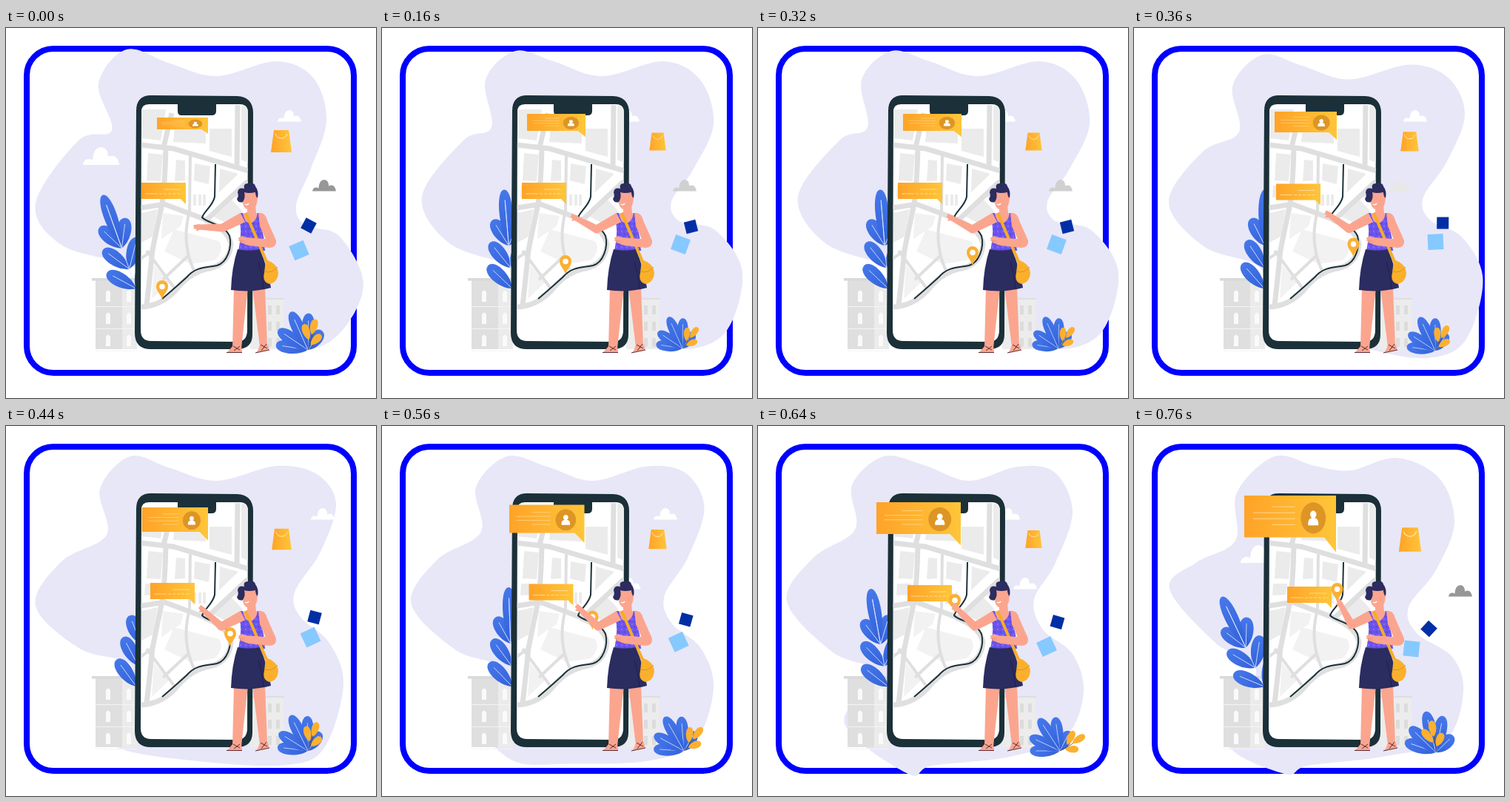
Write an HTML page that moves like this. It is 500x500 px and loops after 800 ms.

```html
<!DOCTYPE html>
<html lang="en">
<head>
<meta charset="utf-8">
<title>Map walk</title>
<style>
html, body { margin: 0; width: 100%; height: 100%; overflow: hidden; background: #fff; }
svg { display: block; width: 100vw; height: 100vh; }
.road { fill: none; stroke: #dfdfdf; stroke-width: 7; }
.skin { fill: #fba58f; }
.navy { fill: #2b2c60; }
.vein { fill: none; stroke: #dfe8ff; stroke-width: .8; }
.line { fill: none; stroke: #ffe2a6; stroke-width: .8; }
</style>
</head>
<body>
<svg viewBox="0 0 500 500" xmlns="http://www.w3.org/2000/svg">
  <defs>
    <linearGradient id="gold"><stop stop-color="#ffa328"/><stop offset="1" stop-color="#ffc539"/></linearGradient>
    <linearGradient id="blue" x1="0" y1="0" x2="0" y2="1"><stop stop-color="#4678ea"/><stop offset="1" stop-color="#3261d9"/></linearGradient>
    <pattern id="dots" width="7" height="7" patternUnits="userSpaceOnUse">
      <rect width="7" height="7" fill="#6b53ee"/><circle cx="2" cy="2" r=".8" fill="#a99bff"/><circle cx="5.5" cy="5.5" r=".8" fill="#4c38c4"/>
    </pattern>
    <path id="cloud" d="M0 24Q1 16 8 16Q12 16 13 18Q14 0 25 0Q34 1 34 13Q43 9 47 17Q49 20 49 24Z"/>
    <path id="screen" d="M193 103H316Q327 103 327 115L326 410Q325 424 312 424L196 423Q182 423 182 408L183 113Q183 103 193 103Z"/>
    <clipPath id="clip"><use href="#screen"/></clipPath>
  </defs>

  <rect width="500" height="500" fill="#fff"/>
  <rect x="28" y="28" width="442" height="438" rx="36" fill="none" stroke="#00f" stroke-width="8"/>
  <path id="blob" fill="#e8e7f8"/>
  <use id="cloudL" href="#cloud" fill="#fff"/>
  <use id="cloudR" href="#cloud" fill="#fff"/>
  <use id="cloudG" href="#cloud"/>
  <g id="houses"></g>
  <g id="leaf"></g>

  <path fill="#1b3038" d="M196 91L312 92Q334 93 334 115L333 414Q333 434 312 434L196 434Q174 434 174 412L176 112Q176 91 196 91Z"/>
  <use href="#screen" fill="#fff"/>
  <g clip-path="url(#clip)">
    <g fill="#ebebeb">
      <path d="M183 110H216L209 152L183 149ZM229 122H270V156L226 154ZM275 136H305V174L275 166ZM318 105H327V182L318 178Z"/>
      <path d="M192 169L212 171L209 207L190 206ZM188 213H207L205 228L187 229ZM230 178L242 179V206L228 207ZM255 183L276 187L274 211L254 206Z"/>
      <path d="M253 225H257V240H253ZM260 225H264V240H260ZM266 225H270V240H266ZM289 190L314 197L288 222ZM279 254L305 232L320 248L302 266ZM309 228L327 212V244Z"/>
      <path d="M183 250L205 245L198 282L183 290Z"/>
    </g>
    <path fill="#f2f2f2" d="M227 272L288 288Q296 300 282 314L250 319L214 302ZM212 250L240 254L236 268L210 285ZM200 320L220 344L197 366Z"/>
    <path class="road" d="M182 158L226 163L327 193M224 115L213 161M313 104L312 190M182 243L214 238L246 250L270 259M327 207L268 262"/>
    <path class="road" stroke-width="6" d="M216 160Q215 210 211 237Q204 270 198 300Q194 340 190 375M182 377Q208 376 228 356Q246 332 270 326Q302 321 304 292Q300 272 268 259"/>
    <path class="road" style="stroke-width:4" d="M249 170L248 248Q238 285 250 318L254 328M190 301L228 352M246 308L212 340M182 312L198 300"/>
    <path fill="none" stroke="#1b3038" stroke-width="2" d="M283 184L282 228C280 240 267 248 265 256C272 264 295 265 302 281C306 296 299 317 285 321C270 324 257 322 244 337Q232 348 211 366"/>
  </g>
  <path fill="#1b3038" d="M232 100H284V112Q284 118 278 118H237Q232 118 232 112Z"/>

  <g id="call">
    <path fill="url(#gold)" d="M0 0H125V76L109 56H0Z"/>
    <path class="line" d="M38 15H69M12 23H69M12 31H69M38 39H69"/>
    <ellipse cx="94" cy="30" rx="17" ry="21" fill="#dd9525"/>
    <path fill="#fff" d="M87 40Q86 31 92 30Q89 27 90 23Q94 17 98 23Q99 27 96 30Q102 31 101 40Z"/>
  </g>
  <g id="msg">
    <path fill="url(#gold)" d="M0 0H60V29L53 22H0Z"/>
    <path class="line" d="M30 9H53M5 15H22"/><path class="line" stroke-dasharray="4 2" d="M24 15H55"/>
  </g>

  <g id="bag">
    <path fill="url(#gold)" d="M-10-15H10L14 15H-14Z"/>
    <path fill="none" stroke="#fff0c8" stroke-width="1" d="M-8-10Q-6-4 0-4Q6-4 8-10"/>
  </g>
  <rect id="dark" x="-8" y="-8" width="16" height="16" fill="#002fa5"/>
  <rect id="pale" x="-10.5" y="-10.5" width="21" height="21" fill="#86c9ff"/>
  <g id="plant"><g id="fan"></g><g id="sprig"></g></g>

  <g id="pin">
    <path fill="#fbb034" d="M0 0C-2-8-8-11-8-18A8 8 0 0 1 8-18C8-11 2-8 0 0Z"/>
    <circle cy="-17.5" r="3.8" fill="#fff"/>
  </g>

  <g id="woman">
    <path class="skin" d="M308 350H327L318 433H306ZM333 350H350L353 429L343 431Z"/>
    <path class="skin" d="M306 430H318L319 438H299Q303 434 306 430ZM343 428L353 426L356 435L338 439Q342 434 343 428Z"/>
    <path fill="none" stroke="#5b2b35" d="M298 438.5H319M307 430L316 435M316 430L308 436M337 439L356 435M344 428L353 433M352 427L345 436"/>
    <path class="skin" d="M326 238H337L338 250L347 251L342 270H318L316 252L326 249Z"/>
    <path fill="url(#dots)" d="M317 250H320Q322 262 329 264Q338 263 340 250H344Q345 270 348 282L350 301H314Q319 276 316 264Z"/>
    <path class="navy" d="M313 299Q328 302 343 299Q354 325 358 351Q332 358 304 354Q305 323 313 299Z"/>
    <path fill="none" stroke="#1f2050" d="M341 316Q347 335 348 353"/>
    <path fill="none" stroke="#f7ad25" stroke-width="4" d="M324 250L353 318"/>
    <path fill="#fbb02c" d="M351 313Q367 318 368 331Q367 344 356 346Q346 343 349 331Z"/>
    <path fill="none" stroke="#e0921c" d="M350 329Q359 332 367 323"/>
    <path class="skin" d="M341 250Q350 248 353 260L365 287Q366 296 357 297L328 294Q315 291 314 284Q318 279 324 283L351 285L343 268Z"/>
    <path fill="none" stroke="#e88b78" stroke-width=".8" d="M314 287L322 288M316 290L323 291"/>
    <path class="skin" d="M320 222H339Q341 232 338 240Q333 247 326 245Q320 243 320 234Z"/>
    <path class="navy" d="M322 217Q320 210 327 210Q336 208 337 214Q342 220 340 230Q337 227 337 222Q328 224 322 222Q324 229 320 235Q314 237 312 231Q315 228 313 222Q314 215 322 217Z"/>
    <path fill="none" stroke="#fff" stroke-width="1.4" d="M323 238Q326 240 328 237"/>
    <path id="arm" class="skin"/>
    <g id="hand" class="skin"><ellipse cx="1" rx="6" ry="4.5"/><path d="M0-4L9-3Q10-1 8 0L10 1Q10 4 6 4H0ZM-2-3L3-7Q6-7 4-4Z"/></g>
  </g>
</svg>
<script>
const $ = id => document.getElementById(id);
const set = (id, attr, value) => $(id).setAttribute(attr, value);
const move = (id, x, y, rest = "") => set(id, "transform", `translate(${x} ${y}) ${rest}`);
const nums = text => text.split(/[ ,]+/).map(Number);
const mix = (a, b) => Object.fromEntries(Object.keys(a).map(k => [k, a[k].map((v, i) => (v + b[k][i]) / 2)]));

// A rounded petal growing from (x, y), leaning by deg
function petal(x, y, deg, len, w, fill, vein = true) {
  const line = vein ? `<path class="vein" d="M0 0V${-len * .8}"/>` : "";
  return `<g transform="translate(${x} ${y}) rotate(${deg})"><path fill="${fill}" d="M0 0C${-w} ${-len * .3} ${-w} ${-len} 0 ${-len}C${w} ${-len} ${w} ${-len * .3} 0 0Z"/>${line}</g>`;
}

const blue = "url(#blue)";
let side = "";
for (const s of [-1, 1])
  for (const [y, deg, len] of [[0, 42, 45], [-28, 34, 44], [-58, 27, 41]]) side += petal(0, y, s * deg, len, 13, blue);
$("leaf").innerHTML = side + petal(0, -60, 0, 74, 12, blue) + '<path class="vein" d="M0 0V-120"/>';

$("fan").innerHTML = [[-71, 45], [-46, 50], [46, 33], [11, 51], [-14, 58]]
  .map(([deg, len]) => petal(0, 0, deg, len, 12, blue)).join("");
$("sprig").innerHTML = '<path fill="none" stroke="#5a4a2c" stroke-width=".8" d="M0 0Q2-14 0-34M1-12L-8-22M1-9L9-18"/>' +
  [[0, -22, 0, 22], [-2, -14, -32, 23], [2, -8, 32, 20]].map(p => petal(...p, 7, "#fcb02f", false)).join("");

const box = (x, y, w, h, fill) => `<rect x="${x}" y="${y}" width="${w}" height="${h}" fill="${fill}"/>`;
const pane = (x, y, w, h) => `<path fill="#fafafa" d="M${x} ${y + h}V${y + 3}q${w / 2}-5 ${w} 0V${y + h}Z"/>`;
let houses = box(157, 341, 20, 93, "#ebebeb") + box(121, 341, 36, 93, "#dfdfdf") + box(116, 338, 60, 3.5, "#d9d9d9") +
  box(330, 367, 45, 67, "#ececec") + box(330, 365, 46, 2, "#dedede");
for (const y of [354, 384, 414]) houses += pane(135, y, 6, 16) + pane(163, y, 6, 16) + box(121, y + 22, 56, 1, "#f4f4f4");
for (const y of [375, 397, 419])
  for (const x of [343, 354, 365]) houses += box(x, y, 5, 12, "#dcdcdc");
$("houses").innerHTML = houses;

// call: x, y, w, h; plant: x, y, scale, turn, sprig turn; cloudG: x, y, grey level
const start = {
  blob: nums("125,75 163,29 222,48 285,65 365,45 415,67 433,125 412,190 392,240 405,267 450,281 483,345 455,408 408,434 350,410 290,370 220,340 160,318 75,293 40,237 98,152 143,138"),
  leaf: [-19.7], plant: [408, 435, .97, -10, 14], bag: [372, 153, 1], dark: [409, 267, 28], pale: [396, 300.5, -23],
  call: [204, 121, 69, 16], msg: [183, 209], pin: [211, 367], elbow: [293, 270], hand: [261, 269],
  cloudL: [104], cloudR: [367], cloudG: [414, 205, 151]
};
const rise = {
  blob: nums("140,70 180,31 232,45 297,65 380,45 430,70 448,130 420,192 391,235 403,262 450,273 487,330 465,410 408,434 350,410 290,370 220,340 165,318 90,290 54,228 110,152 148,134"),
  leaf: [-4.7], plant: [406, 433, .8, -10, 36], bag: [372.5, 153.5, .8], dark: [417.5, 268.5, -14], pale: [403.5, 292.5, 20],
  call: [196, 116, 79, 23], msg: [189, 209], pin: [248, 333], elbow: [290, 272], hand: [262, 257],
  cloudL: [190], cloudR: [316], cloudG: [393, 205, 208]
};
const turn = {
  blob: nums("127,85 168,41 222,57 285,74 365,54 420,65 446,105 425,170 390,225 398,258 437,293 456,350 430,435 380,458 270,454 150,434 145,390 170,325 100,301 40,243 75,183 136,147"),
  leaf: [6], plant: [408, 439, .92, -12, 18], bag: [372.5, 153, .95], dark: [417, 258.5, 15], pale: [411.5, 285.5, -25],
  call: [184, 110, 89, 33], msg: [195, 212], pin: [303, 298], elbow: [291, 271], hand: [267, 249],
  cloudL: [190], cloudR: [412], cloudG: [290, 205, 255]
};
const lift = {
  blob: nums("127,80 170,41 225,53 285,74 350,55 400,62 425,115 402,185 373,235 385,275 425,308 440,360 415,420 340,447 235,459 203,470 117,402 160,335 100,305 39,237 75,178 131,140"),
  leaf: [-10.3], plant: [408, 439, .9, -19, 58], bag: [372.5, 153, .8], dark: [404.5, 265, 16], pale: [390, 298, -25],
  call: [160, 103, 114, 43], msg: [202, 215], pin: [266, 253], elbow: [293, 271], hand: [268, 246],
  cloudL: [190], cloudR: [322], cloudG: [345, 205, 255]
};
const end = {
  blob: nums("139,90 190,41 245,54 292,60 355,43 412,70 433,130 408,195 371,245 382,280 430,312 445,360 420,425 335,447 235,459 203,470 124,425 165,330 110,293 48,220 85,184 137,155"),
  leaf: [-25.4], plant: [408, 441, .98, 0, -8], bag: [373, 153.5, 1.08], dark: [398.5, 274, 43], pale: [375, 301, 6],
  call: [149, 94, 124, 56.5], msg: [207, 217], pin: [274.5, 238], elbow: [294, 269], hand: [279, 241],
  cloudL: [144], cloudR: [276], cloudG: [425, 215, 151]
};
const near = { ...rise, pin: [290, 321] };
const steps = [[0, start], [160, rise], [320, near], [360, mix(near, turn)], [440, turn], [560, mix(turn, lift)], [640, lift], [760, end]];
const LOOP = 800;

// Closed smooth curve through points
function smooth(flat) {
  const n = flat.length / 2;
  const at = i => { const k = (i + n) % n; return [flat[2 * k], flat[2 * k + 1]]; };
  let d = `M${at(0)}`;
  for (let i = 0; i < n; i++) {
    const [a, b, c, e] = [at(i - 1), at(i), at(i + 1), at(i + 2)];
    const p = [0, 1].map(k => b[k] + (c[k] - a[k]) / 6);
    const q = [0, 1].map(k => c[k] - (e[k] - b[k]) / 6);
    d += `C${p} ${q} ${c}`;
  }
  return d + "Z";
}

const disc = (x, y, r) => `M${x - r} ${y}a${r} ${r} 0 1 1 ${2 * r} 0a${r} ${r} 0 1 1 ${-2 * r} 0Z`;
function limb([ax, ay], [bx, by], ra, rb) {
  const len = Math.hypot(bx - ax, by - ay), nx = (by - ay) / len, ny = (ax - bx) / len;
  return `M${ax - nx * ra} ${ay - ny * ra}L${ax + nx * ra} ${ay + ny * ra}L${bx + nx * rb} ${by + ny * rb}L${bx - nx * rb} ${by - ny * rb}Z` + disc(bx, by, rb);
}

function draw(p) {
  set("blob", "d", smooth(p.blob));
  move("leaf", 176, 352, `rotate(${p.leaf})`);
  const [x, y, size, lean, sprig] = p.plant;
  move("plant", x, y, `scale(${size})`);
  set("fan", "transform", `rotate(${lean})`);
  set("sprig", "transform", `rotate(${sprig})`);
  move("bag", p.bag[0], p.bag[1], `scale(${p.bag[2]})`);
  for (const id of ["dark", "pale"]) move(id, p[id][0], p[id][1], `rotate(${p[id][2]})`);
  const [cx, cy, w, h] = p.call;
  move("call", cx, cy, `scale(${w / 125} ${h / 56})`);
  move("msg", ...p.msg);
  move("pin", ...p.pin);
  move("cloudL", p.cloudL[0], 161);
  move("cloudR", p.cloudR[0], 111, "scale(.65)");
  const [gx, gy, level] = p.cloudG;
  move("cloudG", gx, gy, "scale(.65)");
  set("cloudG", "fill", `rgb(${level},${level},${level})`);
  set("arm", "d", limb([320, 256], p.elbow, 7, 5.5) + limb(p.elbow, p.hand, 5.5, 3.5));
  const dx = p.hand[0] - p.elbow[0], dy = p.hand[1] - p.elbow[1];
  move("hand", ...p.hand, `rotate(${Math.atan2(dy, dx) * 180 / Math.PI}) scale(.8)`);
}

let shown;
function tick() {
  const t = performance.now() % LOOP;
  const pose = steps.findLast(s => s[0] <= t)[1];
  if (pose !== shown) draw(shown = pose);
  requestAnimationFrame(tick);
}
tick();
</script>
</body>
</html>
```
